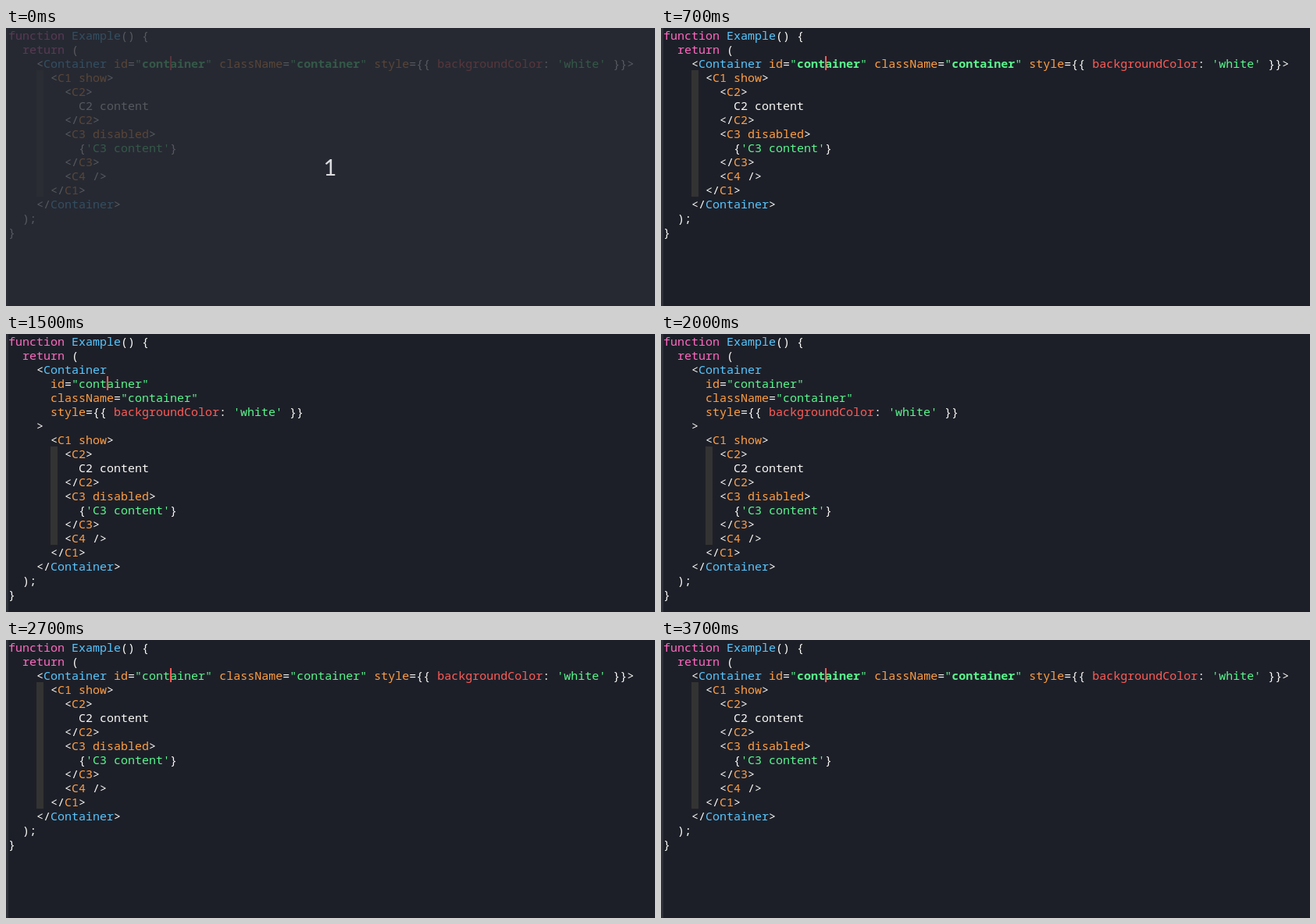
Write an HTML page that moves like this. It is 831 px wide and 356 px high and loops after 3800 ms.

```html
<!DOCTYPE html>
<html lang="en">
<head>
<meta charset="utf-8">
<title>Code formatting</title>
<style>
  html, body { margin: 0; width: 100%; height: 100%; overflow: hidden; background: #1d1f28; }
  svg { display: block; width: 831px; height: 356px; }
  text { white-space: pre; }
  .code { font: 15px "Noto Sans Mono", monospace; fill: #f9f9f6; }
  .keyword { fill: #ff6ac1; }
  .name { fill: #57c7ff; }
  .attr { fill: #ff9f43; }
  .prop { fill: #ff5c57; }
  .string, .word { fill: #5af78e; }
  .bold .word { font-weight: 700; }
  .count { font: 29px Lato, sans-serif; fill: #dcdde0; text-anchor: middle; }
</style>
</head>
<body>
<svg viewBox="0 0 831 356">
  <rect width="831" height="356" fill="#1d1f28"/>
  <rect width="3" height="356" fill="#2e3039"/>
  <rect id="guide" width="9" fill="#333333"/>
  <g id="inline" class="code"></g>
  <g id="stacked" class="code"></g>
  <rect id="cursor" width="2" height="18" fill="#ff5c57"/>
  <g id="overlay">
    <rect width="831" height="356" fill="#2a2c35" fill-opacity=".78"/>
    <text class="count" x="415" y="189">1</text>
  </g>
</svg>
<script>
const LOOP = 3800, LEFT = 3, CHAR = 9, LINE = 18, BASE = 15;
const $ = id => document.getElementById(id);

const head = `function Example() {
  return (
    <Container`;
const tail = `
      <C1 show>
        <C2>
          C2 content
        </C2>
        <C3 disabled>
          {'C3 content'}
        </C3>
        <C4 />
      </C1>
    </Container>
  );
}`;
const attrs = ['id="container"', 'className="container"', "style={{ backgroundColor: 'white' }}"];

const rule = new RegExp([
  "(?<string>'[^']*'|\")",
  "(?<word>container)",
  "(?<keyword>function|return)",
  "(?<name>Example|Container)",
  "(?<prop>backgroundColor)",
  "(?<attr>\\b(?:C\\d(?! content)|show|disabled|id|className|style)\\b)"
].join("|"), "g");

const escapeHtml = s => s.replace(/</g, "&lt;").replace(/>/g, "&gt;");

function highlight(line) {
  let html = "", last = 0;
  for (const m of line.matchAll(rule)) {
    const kind = Object.keys(m.groups).find(k => m.groups[k]);
    html += escapeHtml(line.slice(last, m.index));
    html += `<tspan class="${kind}">${m[0]}</tspan>`;
    last = m.index + m[0].length;
  }
  return html + escapeHtml(line.slice(last));
}

function typeset(code) {
  return code.split("\n").map((line, row) => {
    const body = line.trimStart();
    const x = LEFT + (line.length - body.length) * CHAR;
    return `<text x="${x}" y="${row * LINE + BASE}">${highlight(body)}</text>`;
  }).join("");
}

$("inline").innerHTML = typeset(head + " " + attrs.join(" ") + ">" + tail);
$("stacked").innerHTML = typeset(head + attrs.map(a => "\n      " + a).join("") + "\n    >" + tail);

function place(el, col, row, rows) {
  el.setAttribute("x", LEFT + col * CHAR);
  el.setAttribute("y", row * LINE);
  el.setAttribute("height", rows * LINE);
}

const show = (el, on) => el.setAttribute("visibility", on ? "visible" : "hidden");

// The cursor blinks every 500 ms, restarting lit whenever the code is reformatted.
function cursorLit(t) {
  const start = t < 1500 ? -300 : t < 2700 ? 1500 : 2700;
  return Math.floor((t - start) / 500) % 2 === 0;
}

function draw(t) {
  const stacked = t >= 1500 && t < 2700;
  const bold = t < 1500 || (t >= 2100 && t < 2700) || t >= 3200;
  show($("inline"), !stacked);
  show($("stacked"), stacked);
  for (const id of ["inline", "stacked"]) $(id).classList.toggle("bold", bold);
  if (stacked) {
    place($("guide"), 6, 8, 7);
    place($("cursor"), 14, 3, 1);
  } else {
    place($("guide"), 4, 3, 9);
    place($("cursor"), 23, 2, 1);
  }
  show($("cursor"), cursorLit(t));
  show($("overlay"), t < 100);
}

const began = performance.now();
function tick() {
  draw((performance.now() - began) % LOOP);
  requestAnimationFrame(tick);
}
draw(0);
requestAnimationFrame(tick);
</script>
</body>
</html>
```
